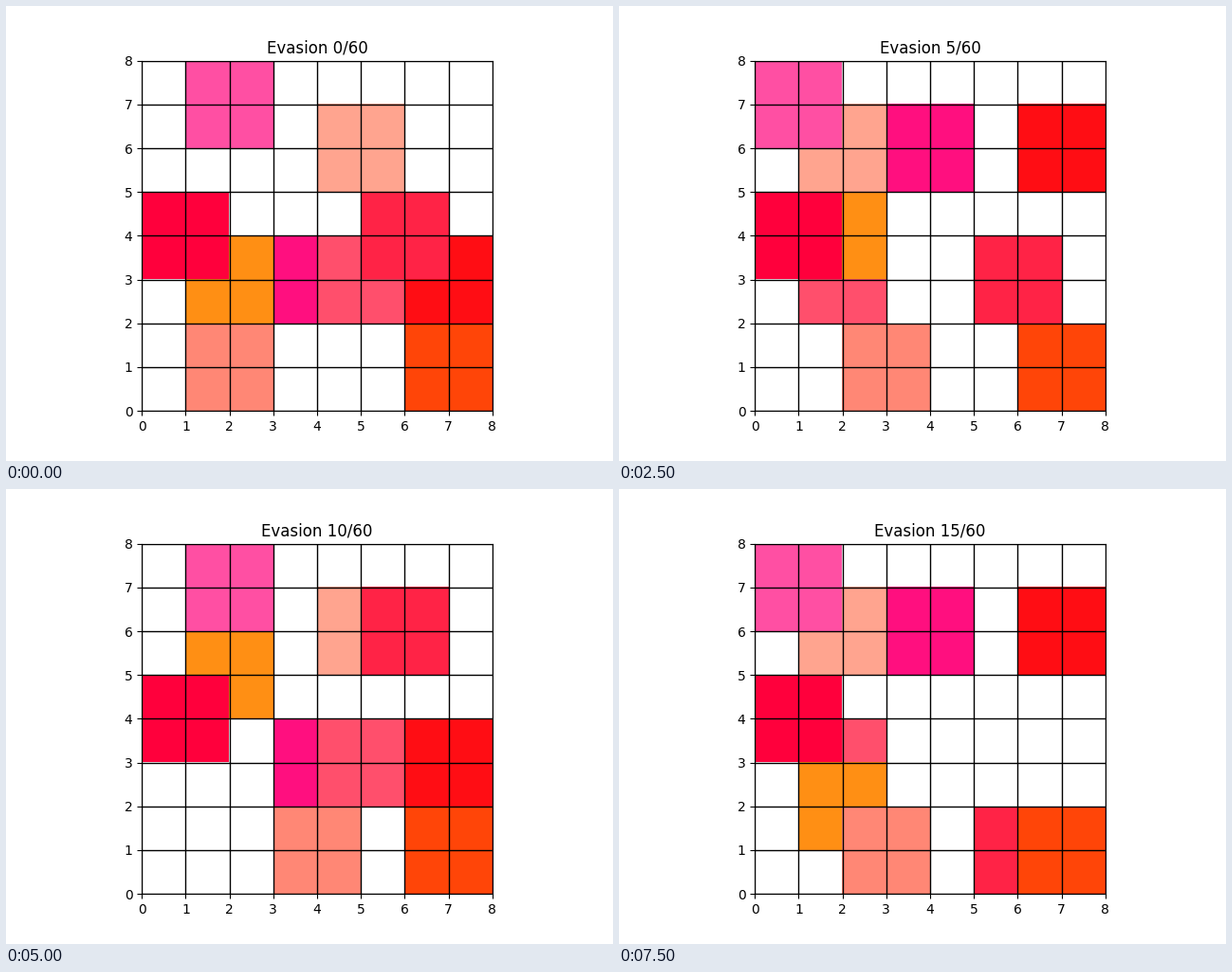
Write a matplotlib script that moves like this. It is 640 px wide and 480 px high and loops after 8000 ms.

```python
import matplotlib.pyplot as plt
import numpy as np
from matplotlib.animation import FuncAnimation
from matplotlib.colors import ListedColormap

SIZE, STEPS, TOTAL = 8, 16, 60

plt.rcParams["text.kerning_factor"] = 6  # whole-pixel letter spacing


def bounce(t, start, low, high, step):
    """Walk one cell per step between low and high, turning at the ends."""
    span = high - low
    phase = start - low if step > 0 else 2 * span - (start - low)
    p = (phase + t) % (2 * span)
    return low + min(p, 2 * span - p)


# colour, home cell (x, y), moving axis, (low, high, first direction);
# later blocks cover earlier ones
BLOCKS = [
    ("#ff0d14", (6, 2), 1, (1, 6, 1)),
    ("#ff0f7f", (3, 2), 1, (1, 6, 1)),
    ("#ff4f6c", (4, 2), 0, (0, 5, -1)),
    ("#ffa48f", (4, 5), 0, (0, 5, -1)),
    ("#ff8f14", (1, 2), 1, (0, 6, -1)),
    ("#ff2346", (5, 3), 1, (0, 6, -1)),
    ("#ff8775", (1, 0), 0, (0, 3, -1)),
    ("#ff4fa3", (1, 6), 0, (0, 1, -1)),
    ("#ff003c", (0, 3), 0, None),
    ("#ff4508", (6, 0), 0, None),
]


def board(t):
    cells = np.zeros((SIZE, SIZE))
    for i, (_, home, axis, path) in enumerate(BLOCKS, 1):
        pos = list(home)
        if path:
            pos[axis] = bounce(t, home[axis], *path)
        x, y = pos
        cells[y:y + 2, x:x + 2] = i
    return cells


fig, ax = plt.subplots(figsize=(6.4, 4.8), dpi=100)
cmap = ListedColormap(["white"] + [b[0] for b in BLOCKS])
image = ax.imshow(board(0), cmap=cmap, vmin=-0.5, vmax=len(BLOCKS) + 0.5,
                  origin="lower", extent=(0, SIZE, 0, SIZE),
                  interpolation="nearest")
ax.set_xticks(range(SIZE + 1))
ax.set_yticks(range(SIZE + 1))
ax.grid(color="black", linewidth=1)
title = ax.set_title("")


def update(t):
    image.set_data(board(t))
    title.set_text(f"Evasion {t}/{TOTAL}")
    return image, title


anim = FuncAnimation(fig, update, frames=STEPS, interval=500, repeat=True)
plt.show()
```
